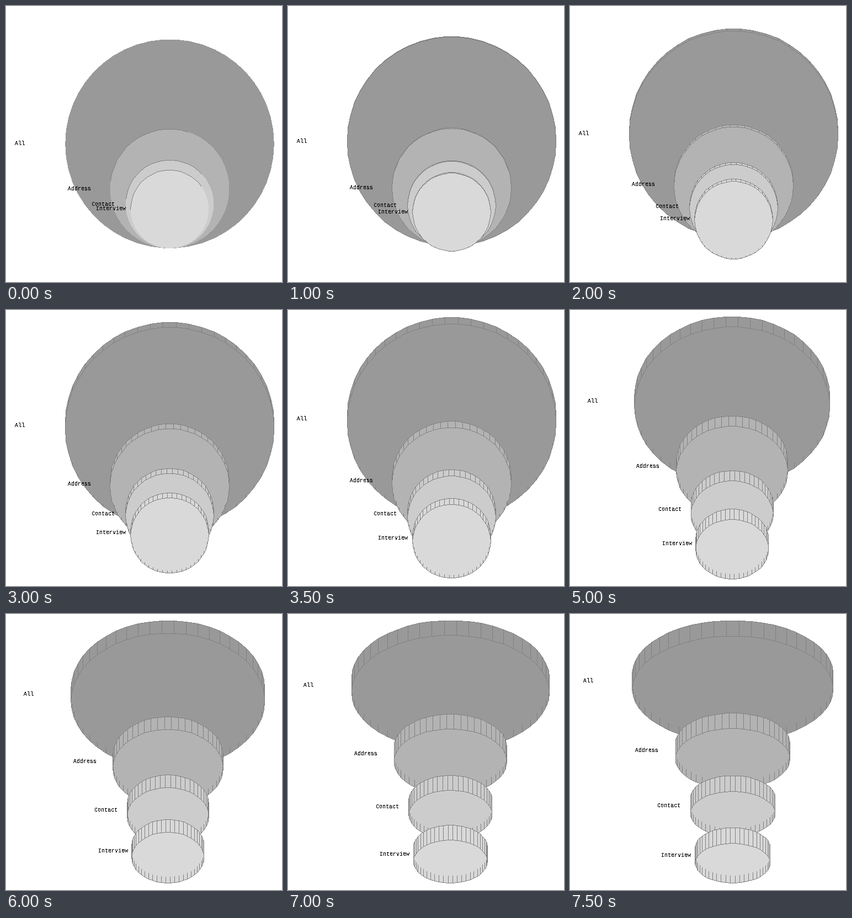
A matplotlib script for the animation above (8000 ms loop, 500x500 px).

```python
import numpy as np
import matplotlib.pyplot as plt
from matplotlib.animation import FuncAnimation
from matplotlib.collections import PolyCollection

FRAMES, INTERVAL = 16, 500
SIDES = 50
PITCH = 104.1            # distance between drums along the axis
DEPTH = PITCH / 3        # thickness of one drum
CENTER_Y = 249.1
FIT_HEIGHT = 475.5
EDGE = "#808080"

# label, radius, grey, label distance in radii, rim part seen when flat
DRUMS = [
    ("All", 189.3, "#999999", 1.434, None),
    ("Address", 108, "#b3b3b3", 1.507, (10, 24)),
    ("Contact", 79.8, "#cccccc", 1.507, (6, 24)),
    ("Interview", 70.7, "#d9d9d9", 1.503, (5, 25)),
]
OUTER = DRUMS[0][1]
SPAN = PITCH * (len(DRUMS) - 1) + DEPTH

phi = np.arange(SIDES + 1) * 2 * np.pi / SIDES
half = SIDES // 2
SQUARE = np.array([(-0.5, -0.5), (0.5, -0.5), (0.5, 0.5), (-0.5, 0.5)])

fig = plt.figure(figsize=(5, 5), dpi=100, facecolor="white")
ax = fig.add_axes([0, 0, 1, 1])


def tilt(i):
    """Ease from a flat view towards 65 degrees."""
    return np.radians(32.5 * (1 - np.cos(np.pi * i / 19)))


def ellipse(cx, cy, rx, ry):
    return np.column_stack([cx + rx * np.cos(phi), cy - ry * np.sin(phi)])


def hull(cx, cy, rx, ry, wall):
    back, front = ellipse(cx, cy, rx, ry), ellipse(cx, cy + wall, rx, ry)
    return np.vstack([back[:half + 1], front[half:], back[:1]])


def trace(path):
    """Whole pixels along a polyline, one per step of the longer side."""
    pts = np.rint(path)
    runs = []
    for a, b in zip(pts[:-1], pts[1:]):
        steps = int(max(abs(b - a).max(), 1))
        runs.append(a + (b - a) * np.linspace(0, 1, steps + 1)[:, None])
    return np.rint(np.vstack(runs))


def draw_lines(paths, z):
    dots = np.unique(np.vstack([trace(p) for p in paths]), axis=0)
    ax.add_collection(PolyCollection(dots[:, None] + SQUARE, facecolors=EDGE,
                                     linewidths=0, antialiaseds=False,
                                     zorder=z), autolim=False)


def draw_drum(n, cx, top, scale, angle):
    label, radius, grey, reach, flat_rim = DRUMS[n]
    c, s = np.cos(angle) * scale, np.sin(angle) * scale
    rx, ry, wall = radius * scale, radius * c, DEPTH * s
    # drums touch along one side of their rims
    y = top + (2 * OUTER - radius) * c + n * PITCH * s
    # the fill stays inside the outline's pixels
    body = hull(cx, y, rx - 0.5, ry - 0.5, wall)
    ax.fill(body[:, 0], body[:, 1], color=grey, lw=0,
            antialiased=False, zorder=n)

    back = ellipse(cx, y, rx, ry)
    front = back + (0, wall)
    if angle > 0:
        lines = [hull(cx, y, rx, ry, wall), front[:half + 1]]
        lines += [[back[k], front[k]] for k in range(half + 1)]
        lines += [[p - (0, 0.46 * wall), p] for p in front[half + 1:-1]]
        draw_lines(lines, n + 0.5)
    elif flat_rim:
        draw_lines([back[flat_rim[0]:flat_rim[1] + 1]], n + 0.5)

    left = cx - reach * rx - 3 * len(label)
    ax.text(round(left), round(y + wall / 2 + 2.4), label,
            family="Liberation Mono", size=7.2, color="black",
            ha="left", va="baseline", antialiased=False, zorder=10)


def draw(i):
    ax.clear()
    ax.set_axis_off()
    ax.set_xlim(-0.5, 499.5)
    ax.set_ylim(499.5, -0.5)
    angle = tilt(i)
    height = 2 * OUTER * np.cos(angle) + SPAN * np.sin(angle)
    scale = min(1, FIT_HEIGHT / height)
    cx = 254 + 42 * scale
    top = CENTER_Y - height * scale / 2
    for n in range(len(DRUMS)):
        draw_drum(n, cx, top, scale, angle)
    return []


anim = FuncAnimation(fig, draw, frames=FRAMES, interval=INTERVAL,
                     init_func=lambda: [], repeat=True, repeat_delay=0)
plt.show()
```
